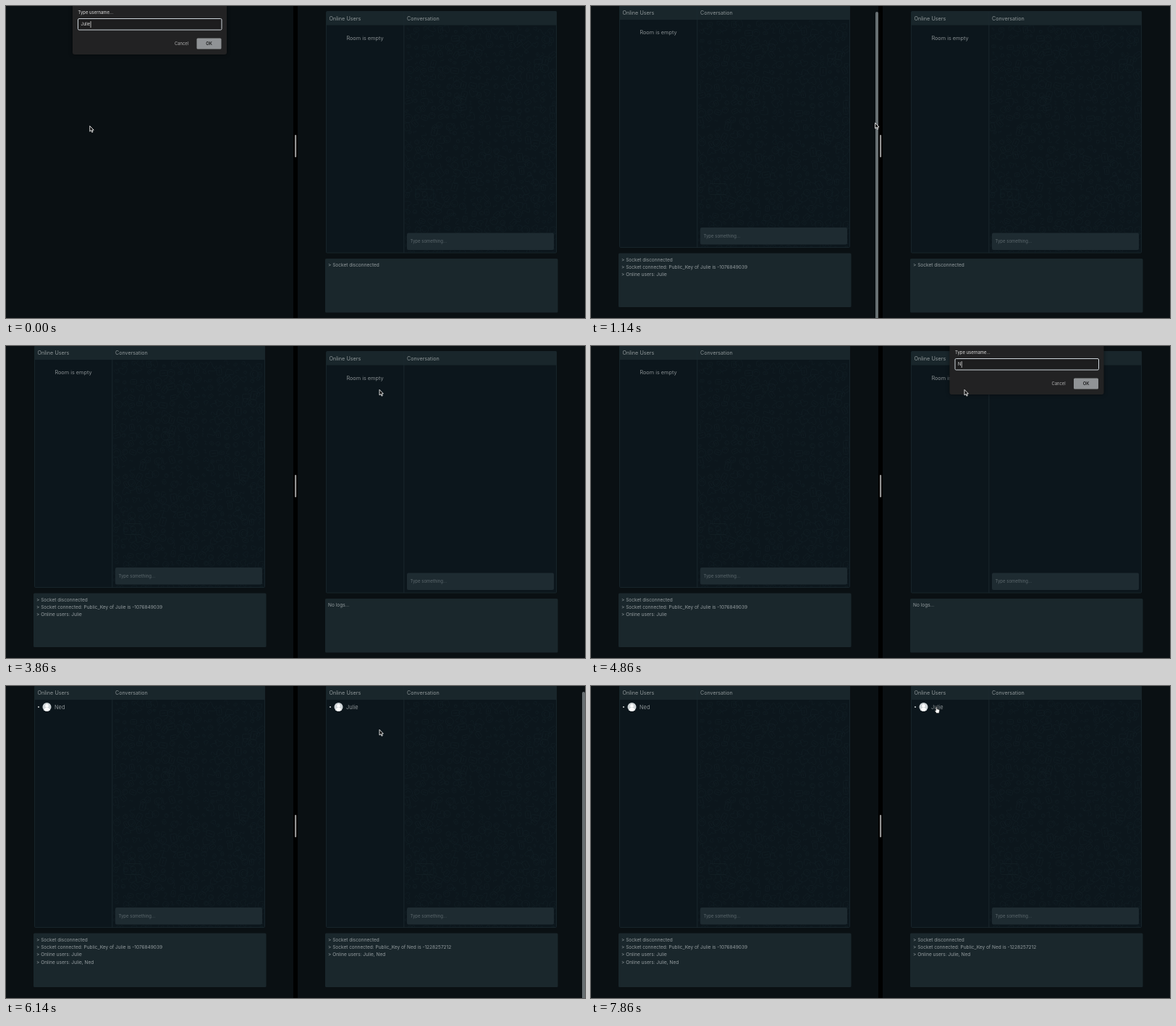
Write an HTML page with a canvas that moves like this. It is 800 by 431 pixels and loops after 8000 ms.

```html
<!DOCTYPE html>
<html lang="en">
<head>
<meta charset="utf-8">
<title>Chat in two windows</title>
<style>
  html, body { margin: 0; width: 100%; height: 100%; overflow: hidden; background: #0a1013; }
  canvas { display: block; width: 800px; height: 431px; }
</style>
</head>
<body>
<canvas id="stage"></canvas>
<script>
const LOOP = 8000, FPS = 7, RIGHT = 403, SCROLL = 7.5;
const A = 'Julie', B = 'Ned';
const canvas = document.getElementById('stage');
const ratio = window.devicePixelRatio || 1;
canvas.width = Math.round(800 * ratio);
canvas.height = Math.round(431 * ratio);
const ctx = canvas.getContext('2d');
const FONT = 'Inter, "Liberation Sans", sans-serif';

const clamp = v => Math.max(0, Math.min(1, v));
const ramp = (t, from, to) => clamp((t - from) / (to - from));

function rect(x, y, w, h, fill, radius = 0, stroke) {
  ctx.beginPath();
  ctx.roundRect(x, y, w, h, radius);
  if (fill) { ctx.fillStyle = fill; ctx.fill(); }
  if (stroke) { ctx.strokeStyle = stroke; ctx.lineWidth = 1; ctx.stroke(); }
}

function disc(x, y, r, fill) {
  ctx.beginPath();
  ctx.arc(x, y, r, 0, 7);
  ctx.fillStyle = fill;
  ctx.fill();
}

// y is the middle of the capitals
function text(str, x, y, size, color, align = 'left', weight = 400) {
  ctx.font = `${weight} ${size}px ${FONT}`;
  ctx.textAlign = align;
  ctx.fillStyle = color;
  ctx.fillText(str, x, y + size * 0.36);
}

// Position between [time, x, y] keys
function along(keys, t) {
  const i = keys.findIndex(k => k[0] > t);
  if (i < 0) return keys[keys.length - 1].slice(1);
  if (i === 0) return keys[0].slice(1);
  const a = keys[i - 1], b = keys[i], p = ramp(t, a[0], b[0]);
  return [a[1] + (b[1] - a[1]) * p, a[2] + (b[2] - a[2]) * p];
}

// Faint wallpaper of small random doodles
function makeDoodles() {
  let seed = 11;
  const rnd = () => (seed = seed * 16807 % 2147483647) / 2147483647;
  const path = new Path2D();
  for (let y = 33; y < 342; y += 11) {
    for (let x = 153; x < 358; x += 11) {
      const s = 2 + rnd() * 4, cx = x + rnd() * 6 - 3, cy = y + rnd() * 6 - 3;
      const turn = rnd() * 6.28, kind = Math.floor(rnd() * 4);
      const item = new Path2D();
      if (kind === 0) {
        item.arc(0, 0, s, 0, 6.28);
        item.moveTo(s / 2, 0);
        item.arc(0, 0, s / 2, 0, 3.1);
      } else if (kind === 1) {
        item.roundRect(-s, -s * 0.7, s * 2, s * 1.4, 1.5);
        item.moveTo(-s * 0.5, 0);
        item.lineTo(s * 0.5, 0);
      } else if (kind === 2) {
        item.moveTo(0, s);
        item.bezierCurveTo(-s * 2, -s * 0.4, -s * 0.7, -s * 1.5, 0, -s * 0.4);
        item.bezierCurveTo(s * 0.7, -s * 1.5, s * 2, -s * 0.4, 0, s);
      } else {
        item.moveTo(-s, 0);
        item.quadraticCurveTo(-s / 2, -s * 1.4, 0, 0);
        item.quadraticCurveTo(s / 2, s * 1.4, s, 0);
      }
      path.addPath(item, new DOMMatrix().translate(cx, cy).rotate(turn * 57.3));
    }
  }
  path.roundRect(163, 253, 25, 15, 2);
  path.moveTo(179, 260);
  path.arc(175.5, 260, 3.5, 0, 6.28);
  return path;
}
const doodles = makeDoodles();

function user(name) {
  const y = 36.5;
  disc(45, y, 1.1, '#c3c9cb');
  ctx.save();
  ctx.beginPath();
  ctx.arc(56.5, y, 6, 0, 7);
  ctx.clip();
  rect(50, y - 7, 13, 14, '#cfd5d8');
  disc(56.5, y - 1.6, 2.3, '#fff');
  disc(56.5, y + 5, 4.1, '#fff');
  ctx.restore();
  text(name, 67, y, 7.4, '#8b9295');
}

function page(x, scroll, { name, logs, wallpaper }) {
  ctx.save();
  ctx.translate(x, -scroll);
  rect(39.5, 7.5, 318, 333.5, '#0c161c', 1, '#17242a');
  if (wallpaper) {
    ctx.save();
    ctx.beginPath();
    ctx.rect(148, 27, 209, 313.5);
    ctx.clip();
    ctx.strokeStyle = '#142026';
    ctx.lineWidth = 0.7;
    ctx.stroke(doodles);
    ctx.restore();
  }
  rect(39.5, 7, 318.5, 19.5, '#19262b', [2, 2, 0, 0]);
  rect(146.5, 8, 0.8, 333, '#1d2a30');
  text('Online Users', 43.5, 17.2, 7.25, '#8f9799');
  text('Conversation', 151, 17.2, 7.15, '#8f9799');
  if (name) user(name);
  else text('Room is empty', 93, 44, 7.3, '#858c8f', 'center');
  rect(151, 313.5, 203, 23.5, '#1e2b31', 2);
  text('Type something...', 155.5, 325.2, 6, '#5c686d');
  rect(38, 349, 321.5, 74.5, '#1a272c', 1.5);
  logs.forEach((line, i) => text(line, 42, 358 + i * 10.3, 6.53, '#949c9f'));
  ctx.restore();
}

// show: 0..1 while opening, out: 0..1 while closing
function dialog(x, value, show, out) {
  ctx.save();
  ctx.globalAlpha = show * (1 - 0.13 * out);
  ctx.translate(x, -2 * out - 6 * (1 - show));
  ctx.shadowColor = 'rgba(0,0,0,.5)';
  ctx.shadowBlur = 5 * ratio;
  rect(92, -20, 213, 87, '#222223', 3);
  ctx.shadowBlur = 0;
  text('Type username...', 99.5, 9.2, 5.95, '#dedede');
  rect(99.5, 17.5, 198.5, 15.5, '#1d1d1e', 1.5, `rgba(205,212,218,${1 - out})`);
  text(value, 103.5, 25.3, 5.7, '#dcdcdc');
  if (out === 0) rect(104 + ctx.measureText(value).width, 21, 0.7, 9, '#eee');
  text('Cancel', 242.5, 52, 5.85, '#b0b0b0', 'center');
  rect(263.5, 44.5, 34, 15, '#909396', 1.5);
  text('OK', 280.5, 52, 5.9, '#1f2021', 'center', 600);
  ctx.restore();
}

function scrollbar(right, width, alpha) {
  if (alpha <= 0) return;
  ctx.globalAlpha = alpha;
  rect(right - width, 8, width, 423, '#687073', [2, 2, 0, 0]);
  ctx.globalAlpha = 1;
}

const ARROW = new Path2D('M0 0V7.6L1.8 6 3 8.8 4.3 8.2 3.1 5.6H5.4Z');
const HAND = new Path2D('M1.6 5V.9Q2.3 0 3 .9V3.5L6 4.2Q6.7 4.5 6.5 5.6L5.8 9.3H2.3L.2 6.2Q.2 5 1.6 5.6Z');
const PATH = [
  [3, 115.8, 165.7], [5, 150, 167], [7, 290, 165], [8, 392.6, 161.5], [9, 598, 130],
  [10, 611, 122], [14, 605.7, 115], [17, 605.7, 115], [18, 460, 95], [19, 340, 72],
  [20, 516, 60.3], [45, 516, 60.3], [47, 250, 44], [48, 75, 29], [50, 75, 29],
  [52, 490, 30], [53, 484, 28], [55, 475, 28.3]
];

function pointer(t) {
  const [x, y] = along(PATH, t);
  const hand = t >= 53 || (t >= 48 && t <= 50);
  ctx.save();
  ctx.translate(x, y);
  ctx.lineJoin = 'round';
  ctx.lineWidth = hand ? 0.6 : 0.9;
  ctx.fillStyle = hand ? '#fff' : '#0a0a0a';
  ctx.strokeStyle = hand ? '#222' : '#f2f2f2';
  ctx.fill(hand ? HAND : ARROW);
  ctx.stroke(hand ? HAND : ARROW);
  ctx.restore();
}

function draw(t) {
  const joined = t >= 42, reloaded = t >= 27;
  ctx.setTransform(ratio, 0, 0, ratio, 0, 0);
  rect(0, 0, 800, 431, '#0a1013');

  if (t < 5) {
    dialog(0, A, 1, ramp(t, 1, 4));
  } else {
    const logs = ['> Socket disconnected',
      `> Socket connected: Public_Key of ${A} is -1076849039`, `> Online users: ${A}`];
    if (joined) logs.push(`> Online users: ${A}, ${B}`);
    page(0, SCROLL * ramp(t, 4, 6), { name: joined && B, logs, wallpaper: true });
    scrollbar(397, t >= 9 ? 7.5 : 4, ramp(t, 4, 6) * (1 - ramp(t, 9, 13)));
  }

  const logs = joined
    ? ['> Socket disconnected', `> Socket connected: Public_Key of ${B} is -1228257212`,
       `> Online users: ${A}, ${B}`]
    : [reloaded ? 'No logs...' : '> Socket disconnected'];
  page(RIGHT, SCROLL * ramp(t, 41, 43), { name: joined && A, logs, wallpaper: joined || !reloaded });
  if (t >= 28 && !joined) {
    const typed = [34, 35, 37].filter(k => t >= k).length;
    dialog(RIGHT + 0.5, B.slice(0, typed), ramp(t, 27, 31), ramp(t, 38, 41));
  }
  scrollbar(800, 4, ramp(t, 41, 43) * (1 - ramp(t, 44, 49)));

  rect(397, 0, 6, 431, '#000');
  rect(399, 178, 2.2, 31, '#939393', 1);
  pointer(t);
}

function tick(now) {
  // Stepped like a 7 fps screen recording
  draw(Math.floor(((now % LOOP) + 5) / 1000 * FPS) % (LOOP / 1000 * FPS));
  requestAnimationFrame(tick);
}
requestAnimationFrame(tick);
</script>
</body>
</html>
```
